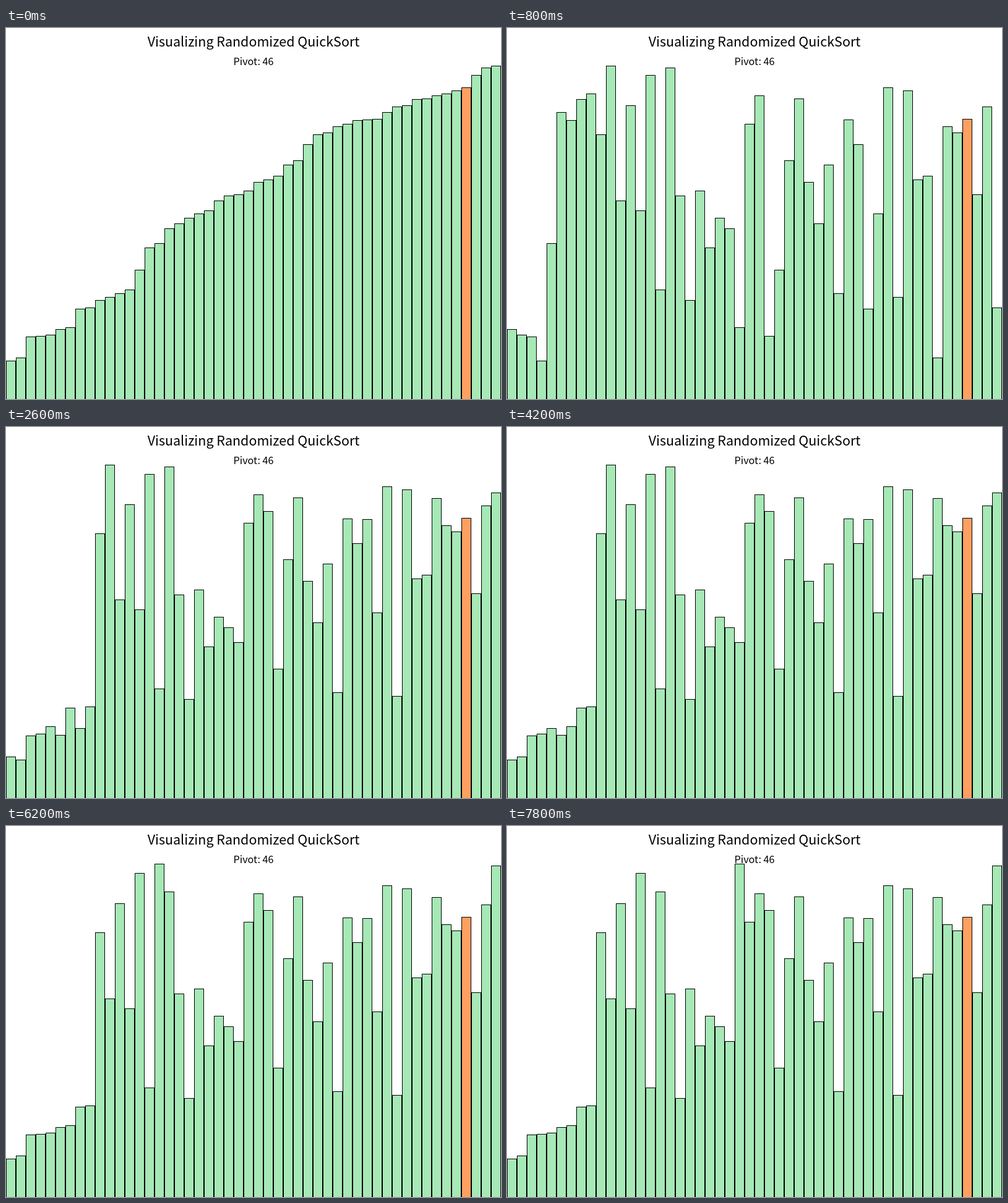
Animation, 800 px wide and 600 px high, one loop 8 s. Source, as an HTML page:

```html
<!DOCTYPE html>
<html lang="en">
<head>
<meta charset="utf-8">
<title>Randomized QuickSort</title>
<style>
  html, body { margin: 0; width: 100%; height: 100%; overflow: hidden; background: #fff; }
  svg { display: block; }
  rect { fill: #a6e8b6; stroke: #000; }
  rect.pivot { fill: #ffa060; }
  text { font-family: "Noto Sans CJK SC", "Noto Sans CJK JP", "Noto Sans CJK", sans-serif; text-anchor: middle; }
</style>
</head>
<body>
<svg width="800" height="600" viewBox="0 0 800 600">
  <g id="bars"></g>
  <text x="400" y="30" font-size="21.5">Visualizing Randomized QuickSort</text>
  <text x="400" y="60" font-size="16.2">Pivot: 46</text>
</svg>
<script>
const STEP = 200, LOOP = 8000, BAR = 16, PIVOT = 46;

// The unsorted input: y of each bar's top edge, so a larger number is a shorter bar.
const input = [
  487, 172, 76, 263, 348, 136, 149, 115, 106, 496, 61, 279, 125, 295, 499, 423, 64,
  271, 440, 538, 355, 307, 324, 484, 155, 109, 498, 391, 214, 114, 249, 316, 221, 429,
  148, 188, 454, 300, 96, 435, 101, 245, 239, 533, 159, 169, 147, 269, 127, 452];

// The random pivot positions, in the order they are drawn.
const picks = [49, 2, 0, 4, 3, 16];

function swap(list, a, b) {
  [list[a], list[b]] = [list[b], list[a]];
}

// Yields the list once per step: after every swap, and once more after each partition.
function* quickSort(list, low, high) {
  if (low >= high) return;
  swap(list, picks.shift(), high);
  let edge = low;
  for (let j = low; j < high; j++) {
    if (list[j] > list[high]) {
      swap(list, edge++, j);
      yield [...list];
    }
  }
  swap(list, edge, high);
  yield [...list];
  yield [...list];
  yield* quickSort(list, low, edge - 1);
  yield* quickSort(list, edge + 1, high);
}

// One step of the finished order, then the sort starts on the new input.
const steps = [[...input].sort((a, b) => b - a)];
const sorting = quickSort([...input], 0, input.length - 1);
while (steps.length < LOOP / STEP) steps.push(sorting.next().value);

const bars = input.map((_, i) => {
  const bar = document.createElementNS("http://www.w3.org/2000/svg", "rect");
  bar.setAttribute("x", i * BAR + 0.5);
  bar.setAttribute("width", BAR - 1);
  bar.setAttribute("height", 600);
  if (i === PIVOT) bar.setAttribute("class", "pivot");
  return document.getElementById("bars").appendChild(bar);
});

function draw() {
  const step = Math.floor((performance.now() % LOOP) / STEP);
  steps[step].forEach((top, i) => bars[i].setAttribute("y", top + 0.5));
  requestAnimationFrame(draw);
}
draw();
</script>
</body>
</html>
```
